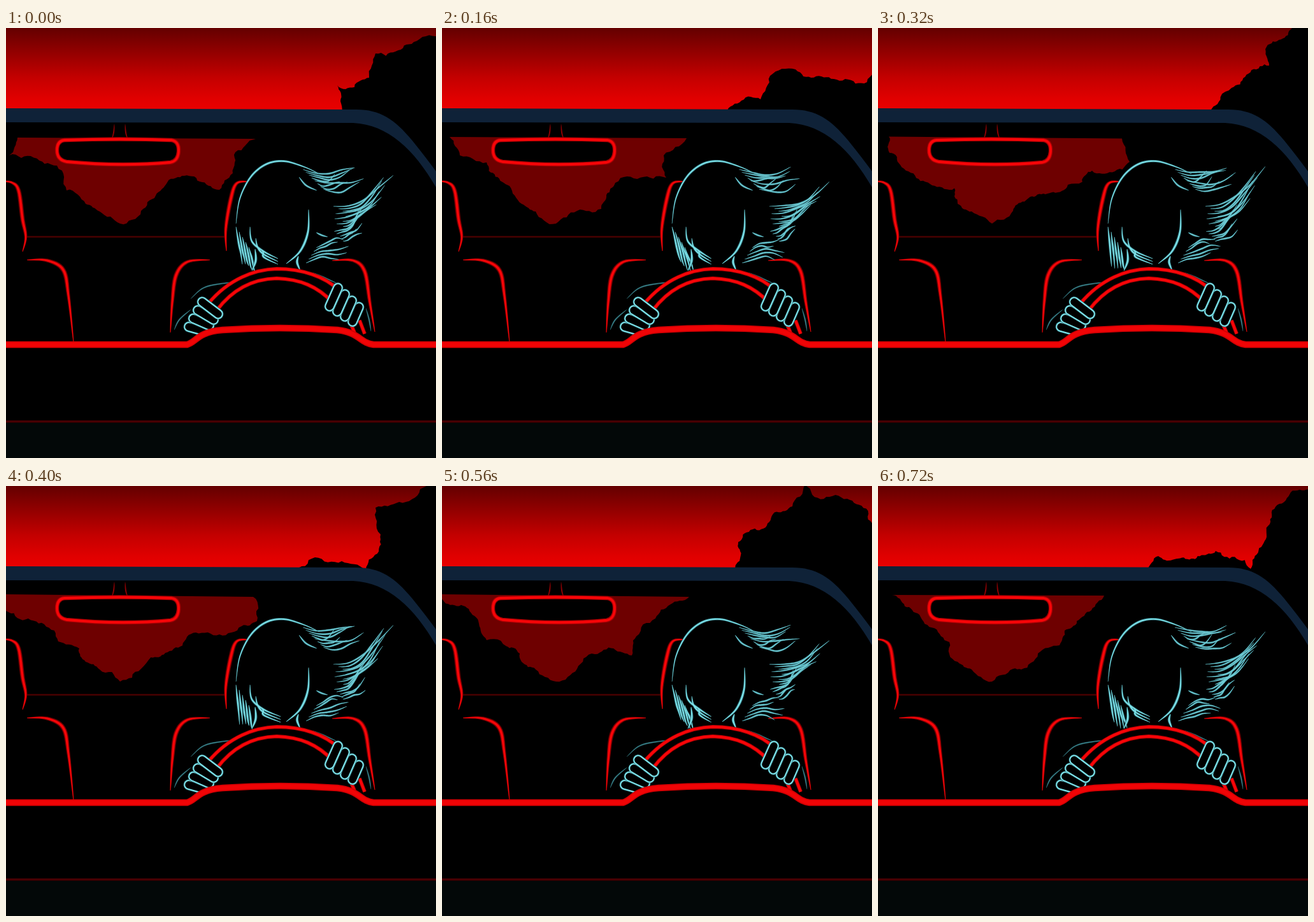
Animation of 675 by 675 pixels, one loop 0.8 s. Source, as an HTML page with a canvas:

```html
<!DOCTYPE html>
<html lang="en">
<head>
<meta charset="utf-8">
<title>Night drive</title>
<style>
html, body { margin: 0; width: 100%; height: 100%; overflow: hidden; background: #000; }
canvas { display: block; width: 675px; height: 675px; }
</style>
</head>
<body>
<canvas id="stage" width="675" height="675"></canvas>
<script>
const g = document.getElementById('stage').getContext('2d');
const STEPS = 10, STEP_MS = 80, SWAY_STEPS = 6, TAU = Math.PI * 2;
const CYAN = '#7ee3ea', TEAL = '#2f6f78', RED = '#f80508', MAROON = '#8d0003';

const pts = s => s.trim().split(/\s+/).map(p => p.split(',').map(Number));
const lines = s => s.split('|').map(pts);
const hash = n => { const v = Math.sin(n * 127.1 + 11.7) * 43758.5453; return v - Math.floor(v); };
const mix = (a, b, t) => a + (b - a) * t;
const midway = (a, b) => a.map((p, i) => p.map((v, j) => mix(v, b[i][j], .5)));

// Key points of the lit window (left and right slope) and of the treetops;
// leaves are grown between them, steps in between are blended.
const scenery = [];
const scene = (i, left, right, trees) => { scenery[i] = [left, right, trees].map(pts); };

scene(0, '18,172 5,200 80,216 95,255', '235,263 280,232 335,254 360,195 392,174',
  '527,132 525,115 520,90 570,78 580,40 640,22 680,13');
scene(1, '28,171 70,183 66,232 120,262', '288,270 297,237 330,201 415,205 420,177',
  '455,132 482,107 545,102 585,131 604,100 565,50 648,0');
scene(2, '12,171 28,200 70,211 106,248', '250,284 272,243 352,235 348,200 384,173',
  '445,132 470,114 500,112 515,75 555,65 615,80 680,72');
scene(3, '38,171 74,236 60,254 125,248', '250,261 298,262 302,228 396,208 378,173',
  '588,132 590,105 583,70 572,46 640,42 640,25 650,-5');
scene(5, '-4,170 -4,194 60,217 115,255', '250,262 298,230 370,220 394,212 388,174',
  '450,132 485,112 527,118 565,131 588,76 580,34 650,5');
scene(7, '-4,170 42,193 70,242 112,254', '240,264 298,266 305,236 335,208 388,174',
  '456,132 465,88 510,62 550,32 570,-2 636,20 680,66');
scene(9, '22,171 65,202 112,245 112,264', '225,288 285,250 312,212 335,195 355,172',
  '420,132 440,110 530,102 585,130 610,80 630,28 680,4');
for (let i = 0; i < STEPS; i++) {
  scenery[i] ||= scenery[i - 1].map((part, k) => midway(part, scenery[i + 1][k]));
}
const valley = pts('125,276 147,288 179,307 212,287');

const face = lines('475,285 474,320 462,350 440,370|391,347 392,365 386,381|459,358 457,368 462,381');
const arms = lines('290,425 310,408 340,401 386,397|264,474 272,458 290,442|565,440 570,458 573,476|481,384 498,391 520,401');
const seats = lines(`-8,240 10,243 20,256 26,300 31,328 26,351|33,364 65,365 90,380 98,420 106,493
  |381,241 362,244 353,268 345,315 346,350|320,364 285,367 267,388 261,430 258,478
  |512,365 545,365 563,382 571,430 579,477`);

const shapes = {
  mirror: new Path2D('M92 176Q180 173 260 176Q272 178 271 194Q270 209 258 211Q180 218 95 210Q80 207 80 192Q80 177 92 176Z'),
  glass: new Path2D('M0 170H335Q400 172 437 180V330H0Z'),
  bar: new Path2D('M0 126L550 128C587 128 610 143 638 177Q659 203 675 225V250C640 190 600 152 545 149L0 148Z'),
  rim: new Path2D('M318 432C350 394 390 379 425 378C465 378 505 393 531 423L515 437C491 408 462 394 425 393C386 394 355 411 331 443Z'),
  rimOut: new Path2D('M318 432C350 394 390 379 425 378C465 378 500 390 522 411M555 459L563 480'),
  rimIn: new Path2D('M331 443C355 411 386 394 425 393C462 394 489 406 512 430M541 464L547 478'),
  dash: new Path2D('M-5 497H284C298 494 300 477 340 474Q430 468 520 474C555 478 555 494 577 497H680')
};

function spline(p, n = 8) {
  const out = [];
  for (let i = 0; i < p.length - 1; i++) {
    const a = p[i - 1] || p[i], b = p[i], c = p[i + 1], d = p[i + 2] || c;
    for (let k = 0; k < n; k++) {
      const t = k / n;
      out.push([0, 1].map(j => b[j] + .5 * t * (c[j] - a[j]
        + t * (2 * a[j] - 5 * b[j] + 4 * c[j] - d[j] + t * (3 * (b[j] - c[j]) + d[j] - a[j])))));
    }
  }
  out.push(p[p.length - 1]);
  return out;
}

function fillPoly(p, color) {
  g.beginPath();
  p.forEach(q => g.lineTo(...q));
  g.closePath();
  g.fillStyle = color;
  g.fill();
}

function rect(x, y, w, h, color) {
  g.fillStyle = color;
  g.fillRect(x, y, w, h);
}

function fillPath(path, color) {
  g.fillStyle = color;
  g.fill(path);
}

function stroke(path, width, color) {
  g.lineWidth = width;
  g.strokeStyle = color;
  g.stroke(path);
}

// Ribbon that thins out at both ends.
function strand(p, width, color) {
  const c = spline(p), left = [], right = [], end = c.length - 1;
  c.forEach(([x, y], i) => {
    const a = c[Math.max(0, i - 1)], b = c[Math.min(end, i + 1)];
    const dx = b[0] - a[0], dy = b[1] - a[1], len = Math.hypot(dx, dy) || 1;
    const w = width * (.15 + .85 * Math.sin(Math.PI * i / end)) / 2;
    left.push([x - dy / len * w, y + dx / len * w]);
    right.unshift([x + dy / len * w, y - dx / len * w]);
  });
  fillPoly(left.concat(right), color);
}

function neon(list, width, core, glow) {
  list.forEach(p => strand(p, width * 1.9, glow));
  list.forEach(p => strand(p, width, core));
}

// Leafy edge: every span is split again and again, its middle pushed aside.
function leafy(p, seed) {
  const split = (a, b, s) => {
    const dx = b[0] - a[0], dy = b[1] - a[1];
    if (Math.hypot(dx, dy) < 6) return [a];
    const off = (hash(s) - .5) * .36;
    const m = [a[0] + dx / 2 - dy * off, a[1] + dy / 2 + dx * off];
    return [...split(a, m, s * 2 + 1), ...split(m, b, s * 2 + 2)];
  };
  return p.slice(1).flatMap((b, i) => split(p[i], b, seed + i * 7)).concat([p[p.length - 1]]);
}

const sky = g.createLinearGradient(0, 0, 0, 130);
[[0, '#640000'], [.25, '#8c0000'], [.6, '#c40000'], [.85, '#e00000'], [1, '#ea0000']].forEach(s => sky.addColorStop(...s));

function drawScenery(i) {
  const [left, right, trees] = scenery[i];
  rect(0, 0, 675, 675, '#000');
  rect(0, 0, 675, 131, sky);
  fillPoly([...leafy(trees, i * 30), [700, -20], [700, 135]], '#000');
  fillPath(shapes.bar, '#0f2238');
  g.save();
  g.clip(shapes.glass);
  fillPoly(leafy([...left, ...valley, ...right], i * 30 + 9), '#6e0000');
  g.restore();
}

function drawCar() {
  rect(32, 326.5, 312, 2.5, '#480000');
  rect(169, 150, 19, 28, '#000');
  strand(pts('170,151 169,164 166,175'), 2, MAROON);
  strand(pts('187,151 188,164 191,175'), 2, MAROON);
  fillPath(shapes.mirror, '#000');
  stroke(shapes.mirror, 6.5, '#a00003');
  stroke(shapes.mirror, 3.8, RED);
  neon(seats, 3.8, RED, '#740002');
}

// One lock of hair: bows down from its root, ripples, and swings at the tip.
function lock(x0, y0, x1, y1, bow, phase, swing) {
  return [0, .25, .5, .75, 1].map(t => [
    mix(x0, x1, t),
    mix(y0, y1, t) + bow * Math.sin(Math.PI * t) + 4 * Math.sin(TAU * t - phase) * t + swing * t * t
  ]);
}

function windLocks(phase) {
  const locks = [], swing = Math.cos(phase - 1.5);
  const add = (n, make) => {
    for (let k = 0; k < n; k++) locks.push(make(k / (n - 1), k));
  };
  // Crown, long middle and low neck locks.
  add(8, (u, k) => lock(mix(466, 498, u), mix(222, 253, u), mix(512, 562, hash(k)), mix(219, 244, u),
    8, phase + k, 3 * swing));
  add(15, (u, k) => lock(512 + 22 * hash(k + 20), mix(280, 335, u), mix(608, 562, u) - 24 * hash(k + 40) * (k > 0) - 6 * swing * u,
    mix(230, 318, u), mix(15, 3, u), phase + k * .8, 18 * swing * (1 - u)));
  add(5, (u, k) => lock(mix(487, 471, u), mix(345, 369, u), 518 + 35 * hash(k + 60), mix(332, 360, u),
    -4, phase + k, 4 * swing));
  locks.push(pts('460,234 471,247 488,255'), pts('487,321 495,325 505,328'));
  return locks;
}

function frontLocks(phase) {
  const sway = 5 * Math.sin(phase);
  const locks = lines('361,307 367,268 384,234 408,214 436,209 468,218 492,229');
  for (let k = 0; k < 5; k++) {
    locks.push(lock(361 + 5 * k, 312 + 8 * k, 371 + 5 * k + sway, 371 + 3 * k, 0, phase + k, 0));
  }
  for (let k = 0; k < 3; k++) {
    const drop = k * 9;
    locks.push([[383 + drop, 312 + 2 * drop], [386 + drop, 335 + drop], [405, 351 + drop / 2], [427 - sway, 362 + drop / 2]]);
  }
  return locks;
}

function drawDriver(i) {
  const phase = TAU * i / SWAY_STEPS;
  g.fillStyle = '#000';
  g.beginPath();
  g.ellipse(424, 292, 58, 79, 0, 0, 7);
  g.fill();
  neon(arms, 1.4, '#3b858d', '#173a40');
  neon(windLocks(phase), 1.7, '#70cdd6', TEAL);
  neon(frontLocks(phase), 2.1, CYAN, TEAL);
  neon(face, 2.4, CYAN, TEAL);
}

// Four rounded fingers, stepping from the first knuckle and fingertip.
function drawHand([kx, ky], [kdx, kdy], [tx, ty], [tdx, tdy]) {
  g.lineCap = 'round';
  for (let k = 3; k >= 0; k--) {
    const finger = new Path2D(`M${kx + kdx * k} ${ky + kdy * k}L${tx + tdx * k} ${ty + tdy * k}`);
    stroke(finger, 17, TEAL);
    stroke(finger, 15.5, CYAN);
    stroke(finger, 11.5, '#000');
  }
  g.lineCap = 'butt';
}

function drawFront() {
  fillPath(shapes.rim, '#000');
  [shapes.rimOut, shapes.rimIn].forEach(p => { stroke(p, 6, '#a50002'); stroke(p, 4, RED); });
  drawHand([308, 430], [-7, 13], [333, 449], [-7, 9]);
  drawHand([521, 408], [11, 10], [508, 437], [12, 8]);
  stroke(shapes.dash, 10.5, '#d40003');
  stroke(shapes.dash, 7, '#f00406');
  rect(0, 503, 675, 172, '#000');
  rect(0, 620, 675, 55, '#030808');
  rect(0, 616, 675, 3.5, '#480003');
}

let shown = -1;
function tick() {
  const i = Math.floor(performance.now() / STEP_MS) % STEPS;
  if (i !== shown) {
    shown = i;
    drawScenery(i);
    drawCar();
    drawDriver(i);
    drawFront();
  }
  requestAnimationFrame(tick);
}
tick();
</script>
</body>
</html>
```
